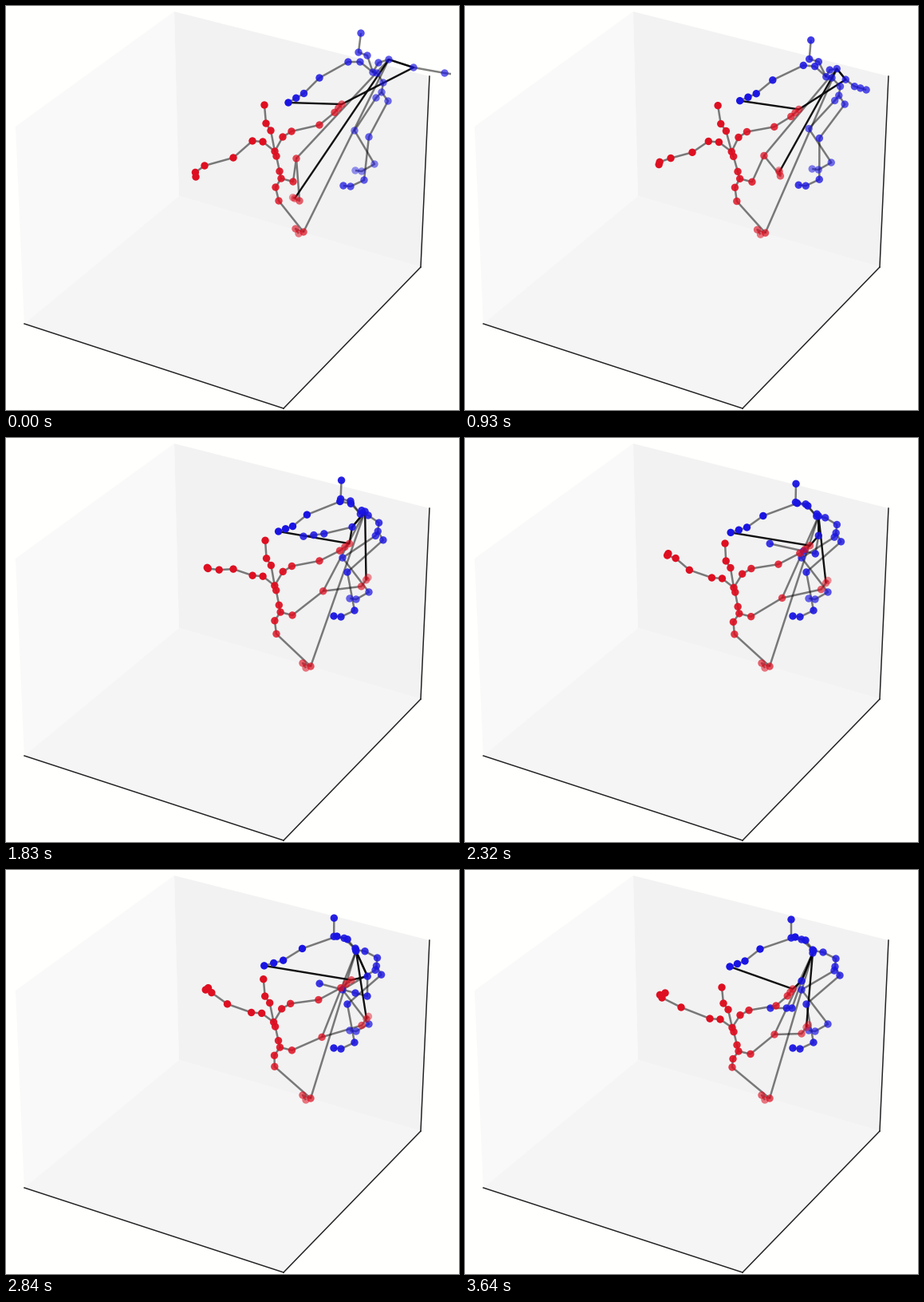
These frames come from a looping animation (568x506 px, 3.66 s). A matplotlib script:

```python
import numpy as np
import matplotlib.pyplot as plt
from matplotlib.animation import FuncAnimation
from matplotlib.collections import LineCollection
from matplotlib.patches import Polygon, Rectangle

W, H, DPI = 568, 506, 64
PX = 72 / DPI                     # one pixel in points
LOOP, TICK = 3660, 20
START, END = 360, 3640

# Bursts of pose changes (first, last, count) with short rests between them.
BURSTS = [(440, 930, 7), (1030, 1530, 6), (1630, 2130, 7),
          (2230, 2720, 12), (2800, 3320, 7), (3420, 3640, 4)]
STEPS = np.concatenate([[0]] + [np.linspace(*b) // TICK * TICK for b in BURSTS])


def progress(t, a=START, b=END):
    return np.clip((t - a) / (b - a), 0, 1)


def settle(t):
    """The change of stance early in the loop."""
    p = progress(t, 620, 1320)
    return p * p * (3 - 2 * p)


def mix(a, b, p):
    return np.add(np.multiply(a, 1 - p), np.multiply(b, p))


def via(t, *stops):
    """Position on a path through (time, x, y) stops."""
    when, x, y = zip(*stops)
    return np.array([np.interp(t, when, x), np.interp(t, when, y)])


def red_body(t):
    p, e = progress(t), settle(t)
    torso = np.array([
        (324, 124), (326, 147), (332, 156), (337, 182), (339, 188), (343, 207),
        (345, 216),                                  # head to hips
        (322, 170), (309, 169), (347, 164), (358, 157),     # shoulders
        (338, 227), (360, 220)], float)                     # hips
    # The body sinks, the head most, and sways less and less.
    height = (216 - torso[:, 1]) / 92
    torso[:, 0] -= 2 * p + 8 * height * (1 - p) * np.sin(np.pi * p / .38)
    torso[:, 1] += p ** 2 * (11 + 12 * height)

    elbow = via(t, (620, 285, 190), (1830, 285, 163), (END, 271, 172))
    wrist = via(t, (620, 249, 200), (1320, 270, 178), (2320, 264, 150),
                (END, 247, 160))
    tip = via(t, (620, 238, 214), (1320, 250, 178), (2320, 255, 144),
              (END, 251, 154))
    left_arm = [*torso[7:9], elbow, wrist, mix(wrist, tip, .6) - (5, 0), tip]

    elbow = via(t, (START, 393, 149), (1320, 384, 153), (1830, 394, 154),
                (END, 390, 170))
    tip = via(t, (START, 421, 123), (1320, 417, 134), (1830, 432, 132),
              (2840, 433, 138), (END, 411, 149))
    right_arm = [*torso[9:11], elbow, mix(elbow, tip, .68) + (0, 2),
                 mix(elbow, tip, .85) + (0, 1), tip]

    # The kick
    knee = via(t, (START, 364, 191), (620, 367, 186), (1830, 399, 192),
               (2840, 396, 210), (END, 388, 206))
    ankle = via(t, (START, 368, 244), (620, 368, 227), (1320, 432, 194),
                (1830, 447, 185), (2840, 446, 195), (END, 422, 205))
    toe = mix((-6, -3), (6, -8), e)
    right_leg = [torso[12], knee, ankle, ankle + toe, ankle + 1.4 * toe]

    ankle = mix((373, 283), (382, 286), e)
    left_leg = [torso[11], mix((342, 244), (335, 247), p), ankle,
                ankle + (-10, -4), ankle + (-6, 2)]
    return torso[:7], left_arm, right_arm, left_leg, right_leg


def blue_body(t):
    p, e = progress(t), settle(t)
    ease = 1 - (1 - p) ** 2
    torso = mix(
        [(445, 34), (442, 58), (453, 62), (460, 83), (465, 84), (473, 96),
         (471, 108), (444, 70), (429, 70), (467, 71), (480, 67),
         (479, 119), (464, 115)],
        [(409, 62), (409, 85), (422, 87), (437, 101), (449, 103), (465, 111),
         (464, 121), (427, 88), (414, 84), (436, 100), (436, 104),
         (470, 132), (463, 126)], ease)

    elbow = mix((393, 90), (370, 99), ease)
    tip = via(t, (START, 354, 121), (1320, 338, 117), (1830, 342, 117),
              (2840, 323, 120), (END, 332, 121))
    left_arm = [*torso[7:9], elbow, mix(elbow, tip, .5) + (0, 4),
                mix(elbow, tip, .75) + (0, 2), tip]

    # This arm swings in from beyond the right edge, then drops.
    elbow = via(t, (START, 511, 77), (620, 509, 81), (1320, 435, 107),
                (1830, 434, 112), (2840, 454, 134), (END, 422, 139))
    wrist = via(t, (START, 550, 84), (620, 557, 87), (1320, 397, 119),
                (1830, 399, 120), (2320, 441, 146), (2840, 454, 159),
                (END, 410, 173))
    tip = via(t, (620, 594, 90), (1320, 382, 125), (1830, 372, 123),
              (2840, 394, 143), (END, 383, 173))
    hand = mix(wrist, tip, .25 + .25 * (1 - progress(t, 1830, 2320)))
    right_arm = [*torso[9:11], elbow, wrist, hand, tip]

    ankle = mix((449, 218), (437, 216), e)
    left_leg = [torso[11], mix((455, 164), (428, 168), e), ankle,
                ankle + (-17, 8), ankle + (-26, 7)]
    ankle = mix((462, 198), (455, 193), e)
    right_leg = [torso[12], mix((437, 156), (422, 150), e), ankle,
                 ankle + (-16, 9), ankle + (-24, 8)]
    return torso[:7], left_arm, right_arm, left_leg, right_leg


def chains(body):
    """Join arms to the spine's top and legs to its base."""
    spine, *limbs = body
    roots = [spine[3], spine[3], spine[6], spine[6]]
    return [spine] + [np.vstack([r, limb]) for r, limb in zip(roots, limbs)]


def shades(rgb, body, spans, gain=0):
    """Dot colours, fading with distance along each limb."""
    fade = [np.linspace(a, b, len(limb)) for limb, (a, b) in zip(body, spans)]
    alpha = np.minimum(np.concatenate(fade) + gain, 1)
    return np.column_stack([np.tile(rgb, (len(alpha), 1)), alpha])


RED, BLUE = (.87, .06, .13), (.1, .08, .89)
RED_FADE = [(1, .9), (1, 1), (.95, .65), (.9, .55), (.85, .45)]
BLUE_FADE = [(.75, .6), (.75, 1), (.7, .65), (.62, .75), (.6, .45)]

fig = plt.figure(figsize=(W / DPI, H / DPI), dpi=DPI, facecolor="#fffffd")
ax = fig.add_axes([0, 0, 1, 1])
ax.set(xlim=(0, W), ylim=(H, 0))
ax.axis("off")

# The box: three panes and the visible axis edges.
TOP, INNER, LEFT = (211, 7), (217, 238), (23, 398)
FRONT, RIGHT, RIGHT_TOP = (348, 504), (520, 327), (531, 88)
for corners, color in [
        ([(12, 151), TOP, INNER, LEFT], "#f9f9f9"),
        ([TOP, RIGHT_TOP, RIGHT, INNER], "#f2f2f2"),
        ([LEFT, FRONT, RIGHT, INNER], "#f5f5f5")]:
    ax.add_patch(Polygon(corners, facecolor=color, edgecolor="none"))
for edge in [(LEFT, FRONT), (FRONT, RIGHT), (RIGHT, RIGHT_TOP)]:
    ax.plot(*zip(*edge), color="#222222", lw=1.5 * PX)

bones = LineCollection([], colors=[(0, 0, 0, .5)], linewidths=2.5 * PX, zorder=3)
links = LineCollection([], colors=[(0, 0, 0, .93)], linewidths=2.4 * PX, zorder=4)
dots = ax.scatter([], [], s=(9.4 * PX) ** 2, linewidths=0, zorder=5)
ax.add_collection(bones)
ax.add_collection(links)
for art in (bones, links, dots):
    art.set_clip_path(Rectangle((0, 0), 558, H, transform=ax.transData))


def draw(i):
    t = STEPS[np.searchsorted(STEPS, i * TICK, side="right") - 1]
    red, blue = red_body(t), blue_body(t)
    _, _, red_arm, red_stand, red_kick = red
    _, blue_guard, blue_arm, _, _ = blue

    shoulder, elbow = blue_arm[1], blue_arm[2]
    faint = [[shoulder, red_kick[1]], [shoulder, red_stand[2]]]
    bones.set_segments(chains(red) + chains(blue) + faint)
    links.set_segments([[blue_guard[-1], red_arm[-1], elbow, shoulder,
                         red_kick[3]]])

    nearer = .2 * progress(t, 620, 1320)
    dots.set_offsets(np.vstack(blue + red))
    dots.set_facecolor(np.vstack([shades(BLUE, blue, BLUE_FADE, nearer),
                                  shades(RED, red, RED_FADE)]))
    return bones, links, dots


anim = FuncAnimation(fig, draw, frames=LOOP // TICK, interval=TICK,
                     repeat=True, repeat_delay=0, blit=False)
plt.show()
```
